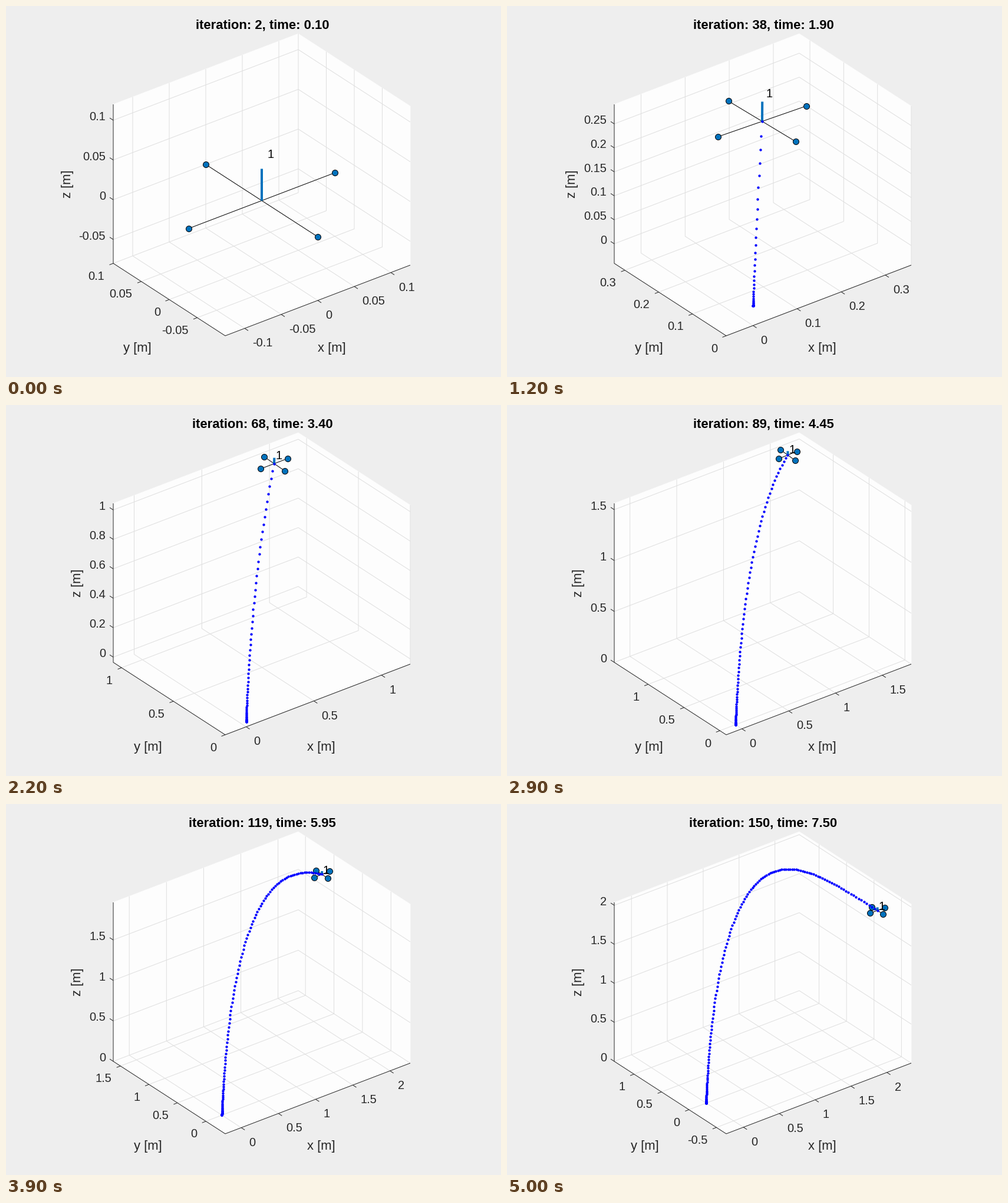
Write a matplotlib script that moves like this. It is 840 px wide and 630 px high and loops after 5.1 s.

```python
import numpy as np
import matplotlib.pyplot as plt
from matplotlib.animation import FuncAnimation

W, H, DPI = 840, 630, 100
PT = 72 / DPI
FRAMES, INTERVAL = 51, 100
LAST_STEP, DT, G = 150, 0.05, 9.81
ARM, MAST = 0.1, 0.04

# Plot box on screen: front corner and the three edge vectors
FRONT = np.array([372, 560])
EDGES = np.array([[314, -120], [-190, -123], [0, -270]])
ASPECT = np.array([1.266, 1, 1])
MAX_TICKS = (6.5, 5, 7)

BLUE, DARK, GRID = "#0072bd", "#262626", "#dfdfdf"
TICK_SIZE, LABEL_SIZE = 20, 22


def smooth(s):
    """Minimum-snap ease from 0 to 1."""
    return s**4 * (35 - 84 * s + 70 * s**2 - 20 * s**3)


def flight(u):
    """Position for u from 0 to 1; y rises along with x, then turns back."""
    x = 2 * smooth(1.103 * u - 0.103 * u**3)
    y = x * (1.21 - 1.463 * u**2.6)
    z = 2 * smooth(1.13 * u - 0.207 * u**3)
    return np.stack([x, y, z], axis=1)


pos = flight(np.linspace(0, 1, LAST_STEP + 1))
acc = np.gradient(np.gradient(pos, DT, axis=0), DT, axis=0)

fig = plt.figure(figsize=(W / DPI, H / DPI), dpi=DPI, facecolor="#eeeeee")
ax = fig.add_axes([0, 0, 1, 1])


def to_screen(frac):
    return FRONT + np.asarray(frac) @ EDGES


def line(points, color, width=1, **kw):
    points = np.asarray(points)
    ax.plot(points[:, 0], points[:, 1], color=color, lw=width * PT,
            solid_capstyle="butt", **kw)


def text(x, y, s, size=TICK_SIZE, color=DARK, ha="center", **kw):
    ax.text(x, y, s, fontsize=size * PT, color=color, ha=ha, va="baseline",
            family="Liberation Sans", **kw)


def label_width(s):
    return sum({"-": 6.66, ".": 5.56}.get(c, 11.12) for c in s)


def tick_values(lo, hi, limit):
    span = hi - lo
    base = 10.0 ** np.floor(np.log10(span / limit))
    step = next(base * m for m in (1, 2, 5, 10) if span / (base * m) <= limit)
    first = int(np.ceil(lo / step - 1e-9))
    last = int(np.floor(hi / step + 1e-9))
    return step * np.arange(first, last + 1)


def draw_axis(i, values, fracs, start, mark, offset, ha):
    """Ticks and labels of one axis; returns the widest label's extra width."""
    names = [f"{round(v, 6) + 0.0:g}" for v in values]
    for f, name in zip(fracs, names):
        p = to_screen(start) + f * EDGES[i]
        line([p, p + mark], DARK)
        text(p[0] + offset[0], p[1] + offset[1], name, ha=ha)
    return max(map(label_width, names)) - label_width("0.5")


def draw_box(lo, hi):
    # Floor and the two back walls as one outline
    outline = to_screen([(0, 0, 0), (1, 0, 0), (1, 0, 1),
                         (1, 1, 1), (0, 1, 1), (0, 1, 0)])
    ax.fill(outline[:, 0], outline[:, 1], color="#fdfdfd", lw=0.5)

    ticks = [tick_values(*lims) for lims in zip(lo, hi, MAX_TICKS)]
    fx, fy, fz = fracs = [(t - a) / (b - a) for t, a, b in zip(ticks, lo, hi)]
    for f in fx:
        line(to_screen([(f, 0, 0), (f, 1, 0), (f, 1, 1)]), GRID)
    for f in fy:
        line(to_screen([(0, f, 0), (1, f, 0), (1, f, 1)]), GRID)
    for f in fz:
        line(to_screen([(0, 1, f), (1, 1, f), (1, 0, f)]), GRID)
    line(to_screen([(0, 1, 1), (0, 1, 0), (0, 0, 0), (1, 0, 0)]), DARK)

    wx = draw_axis(0, ticks[0], fracs[0], (0, 0, 0), (6, 3.9), (13, 31), "left")
    wy = draw_axis(1, ticks[1], fracs[1], (0, 0, 0), (-6.5, 2.5), (-15, 27.5),
                   "right")
    wz = draw_axis(2, ticks[2], fracs[2], (0, 1, 0), (-6, -3.9), (-13, 0),
                   "right")
    text(535 + wx, 587, "x [m]", LABEL_SIZE)
    text(241 - wy, 587, "y [m]", LABEL_SIZE)
    text(127.5 - wz, 302, "z [m]", LABEL_SIZE, rotation=90,
         rotation_mode="anchor")


def limits(step):
    """Hug the drone and its trail, then grow to equal scale on all axes."""
    c = pos[step]
    reach = np.array([ARM, ARM, 0])
    data = np.vstack([pos[:step + 1], c - reach, c + reach, c + [0, 0, MAST]])
    low, high = data.min(axis=0), data.max(axis=0)
    size = ((high - low) / ASPECT).max()
    mid, half = (low + high) / 2, size * ASPECT / 2
    return mid - half, mid + half, size


def update(k):
    ax.clear()
    ax.set(xlim=(0, W), ylim=(H, 0))
    ax.axis("off")

    step = min(2 + 3 * k, LAST_STEP)
    lo, hi, size = limits(step)
    draw_box(lo, hi)

    def project(p):
        return to_screen((np.asarray(p) - lo) / (hi - lo))

    # The drone leans into its acceleration
    c = pos[step]
    lean_x, lean_y = acc[step, :2] / G
    arms = ARM * np.array([[1, 0, -lean_x], [0, 1, -lean_y]])
    for arm in arms:
        ends = project([c - arm, c + arm])
        line(ends, "black")
        line(ends, "black", 0, marker="o", ms=10 * PT, mfc=BLUE, mec="black",
             mew=PT)
    line(project([c, c + MAST * np.array([lean_x, lean_y, 1])]), BLUE, 4)

    trail = project(pos[3:step + 1])
    line(trail, "blue", 0, marker="o", ms=4.3 * PT, mew=0)

    x, y = project(c)
    scale = 0.2 / size
    text(x + 6.5 + 8.5 * scale, y - 80 * scale + 7.5, "1", color="black")
    text(435, 39, f"iteration: {step}, time: {step * DT:.2f}", LABEL_SIZE,
         "black", weight="bold")
    return []


anim = FuncAnimation(fig, update, frames=FRAMES, interval=INTERVAL,
                     init_func=lambda: [], repeat=True, repeat_delay=0)
plt.show()
```
